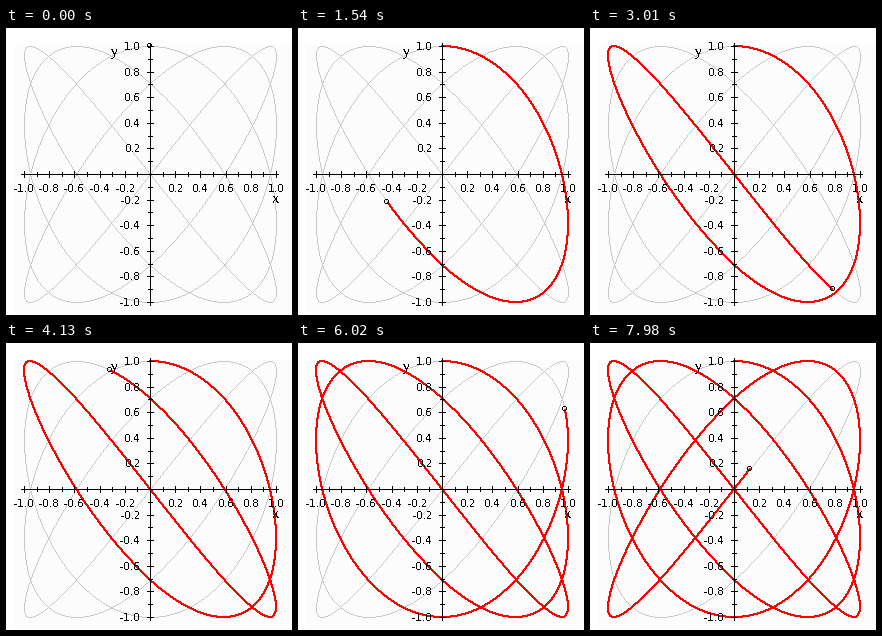
Write a matplotlib script that moves like this. It is 286 by 287 pixels and loops after 8 s.

```python
import numpy as np
import matplotlib.pyplot as plt
from matplotlib.animation import FuncAnimation

W, H = 286, 287
DPI = 64
PX = 72 / DPI          # points per pixel
CX, CY = 144, 146      # origin of the axes
RX, RY = 126, 128      # length of one unit
STEPS = 49             # steps in a full turn of the curve
INTERVAL, FRAMES = 20, 400

BLACK, RED, GREY, PAPER = (0, 0, 0), (255, 0, 0), (200, 200, 200), (252, 252, 252)
PEN = [(dx, dy) for dx in (-1, 0) for dy in (-1, 0)]
RING = [(dx - 1, dy - 1) for dx in range(-2, 3) for dy in range(-2, 3)
        if round(np.hypot(dx, dy)) == 2]

plt.rcParams["text.antialiased"] = False
plt.rcParams["text.hinting_factor"] = 1


def curve(t):
    return CX + RX * np.sin(4 * t), CY - RY * np.cos(5 * t)


def even_path():
    """Parameter and pixels of the curve, about one point per pixel step."""
    t = np.linspace(0, 2 * np.pi, 20000)
    x, y = curve(t)
    stride = np.maximum(abs(np.diff(x)), abs(np.diff(y)))
    length = np.concatenate([[0], np.cumsum(stride)])
    t = np.interp(np.arange(int(length[-1]) + 1), length, t)
    return t, *(np.rint(v).astype(int) for v in curve(t))


def stamp(canvas, xs, ys, offsets, color):
    for dx, dy in offsets:
        canvas[ys + dy, xs + dx] = color


def step_at(ms):
    """Steps last 210 ms; the first of every 16 holds for 280 ms."""
    starts = [0]
    while starts[-1] <= ms:
        long_hold = (len(starts) - 1) % 16 == 0
        starts.append(starts[-1] + (280 if long_hold else 210))
    return len(starts) - 2


fig = plt.figure(figsize=(W / DPI, H / DPI), dpi=DPI, facecolor="white")
ax = fig.add_axes([0, 0, 1, 1])

path_t, path_x, path_y = even_path()
base = np.full((H, W, 3), 255, np.uint8)
base[17:, 8:] = PAPER
stamp(base, path_x, path_y, [(0, 0)], GREY)

# Axes with ticks every 0.1, longer and labelled every 0.2
scale = np.zeros((H, W), bool)
scale[CY, 15:273] = True
scale[15:278, CX] = True
font = dict(family="DejaVu Sans", size=10 * PX, va="baseline")
for i in range(-10, 11):
    x, y = CX + round(RX * i / 10), CY - round(RY * i / 10)
    major = i % 2 == 0
    r = 3 if major else 2
    scale[CY - r:CY + r + 1, x] = True
    scale[y, CX - r:CX + r + 1] = True
    if major and i:
        label = f"{i / 10:.1f}"
        ax.text(x + 0.5, 164, label, ha="center", **font)
        ax.text(135, y + 4, label, ha="right", **font)

for letter, x, y in (("x", 266, 175), ("y", 105, 28)):
    ax.text(x, y, letter, family="Liberation Serif", size=15 * PX, va="baseline")

image = ax.imshow(base, extent=(0, W, H, 0), interpolation="nearest",
                  aspect="auto")
ax.set(xlim=(0, W), ylim=(H, 0))
ax.axis("off")


def update(frame):
    k = step_at(frame * INTERVAL + INTERVAL / 2)
    end = 2 * np.pi * k / STEPS
    canvas = base.copy()
    if k:
        drawn = path_t <= end
        stamp(canvas, path_x[drawn], path_y[drawn], PEN, RED)
    canvas[scale] = BLACK
    tip_x, tip_y = (int(np.rint(v)) for v in curve(end))
    stamp(canvas, tip_x, tip_y, RING, BLACK)
    image.set_data(canvas)
    return image,


anim = FuncAnimation(fig, update, frames=FRAMES, interval=INTERVAL,
                     init_func=lambda: update(0), repeat=True, repeat_delay=0)
plt.show()
```
